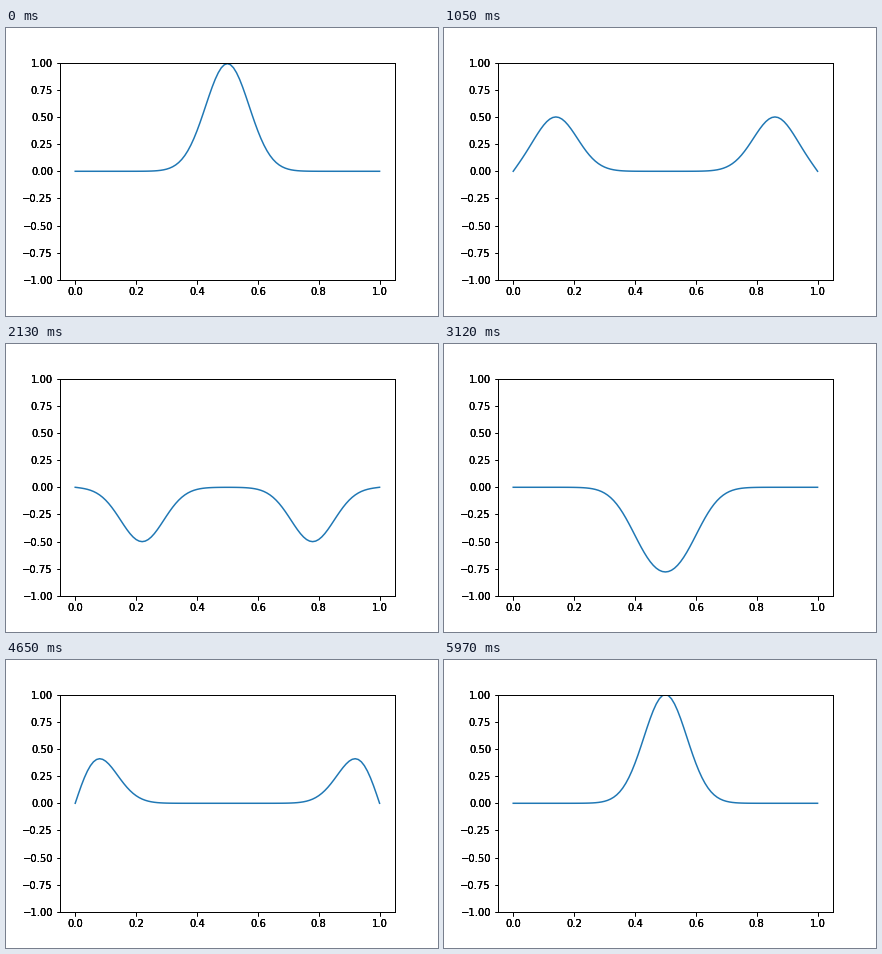
A matplotlib script that plays this animation: 432 px wide and 288 px high, repeating every 6 s.

```python
import numpy as np
import matplotlib.pyplot as plt
from matplotlib.animation import FuncAnimation

FRAMES = 200
INTERVAL = 30
STEP = 0.01      # distance travelled per frame
OVERDRAW = 3     # repeated passes give the axes and labels a heavy, crisp look

plt.rcParams["font.family"] = "DejaVu Sans"

x = np.linspace(0, 1, 101)


def pulse(s):
    """Gaussian pulse extended as an odd function with period 2."""
    s = (s + 1) % 2 - 1
    return np.sign(s) * np.exp(-100 * (np.abs(s) - 0.5) ** 2)


def wave(shift):
    """String with fixed ends, released from rest (d'Alembert)."""
    u = 0.5 * (pulse(x - shift) + pulse(x + shift))
    u[[0, -1]] = 0
    return u


def make_axes(fig):
    ax = fig.add_axes([0.125, 0.125, 0.775, 0.755])
    ax.set(xlim=(-0.05, 1.05), ylim=(-1, 1),
           xticks=np.linspace(0, 1, 6), yticks=np.linspace(-1, 1, 9))
    ax.xaxis.set_major_formatter("{x:.1f}")
    ax.yaxis.set_major_formatter(
        lambda v, _: f"{v:.2f}".replace("-", "\N{MINUS SIGN}"))
    return ax


fig = plt.figure(figsize=(6, 4), dpi=72, facecolor="white")
ax, *overlays = [make_axes(fig) for _ in range(OVERDRAW)]
for over in overlays:
    over.patch.set_visible(False)

line, = ax.plot(x, wave(STEP), color="#1f77b4", lw=1.5)


def update(i):
    line.set_ydata(wave(STEP * (i + 1)))
    return line,


anim = FuncAnimation(fig, update, frames=FRAMES, interval=INTERVAL,
                     repeat=True, repeat_delay=0)
plt.show()
```
